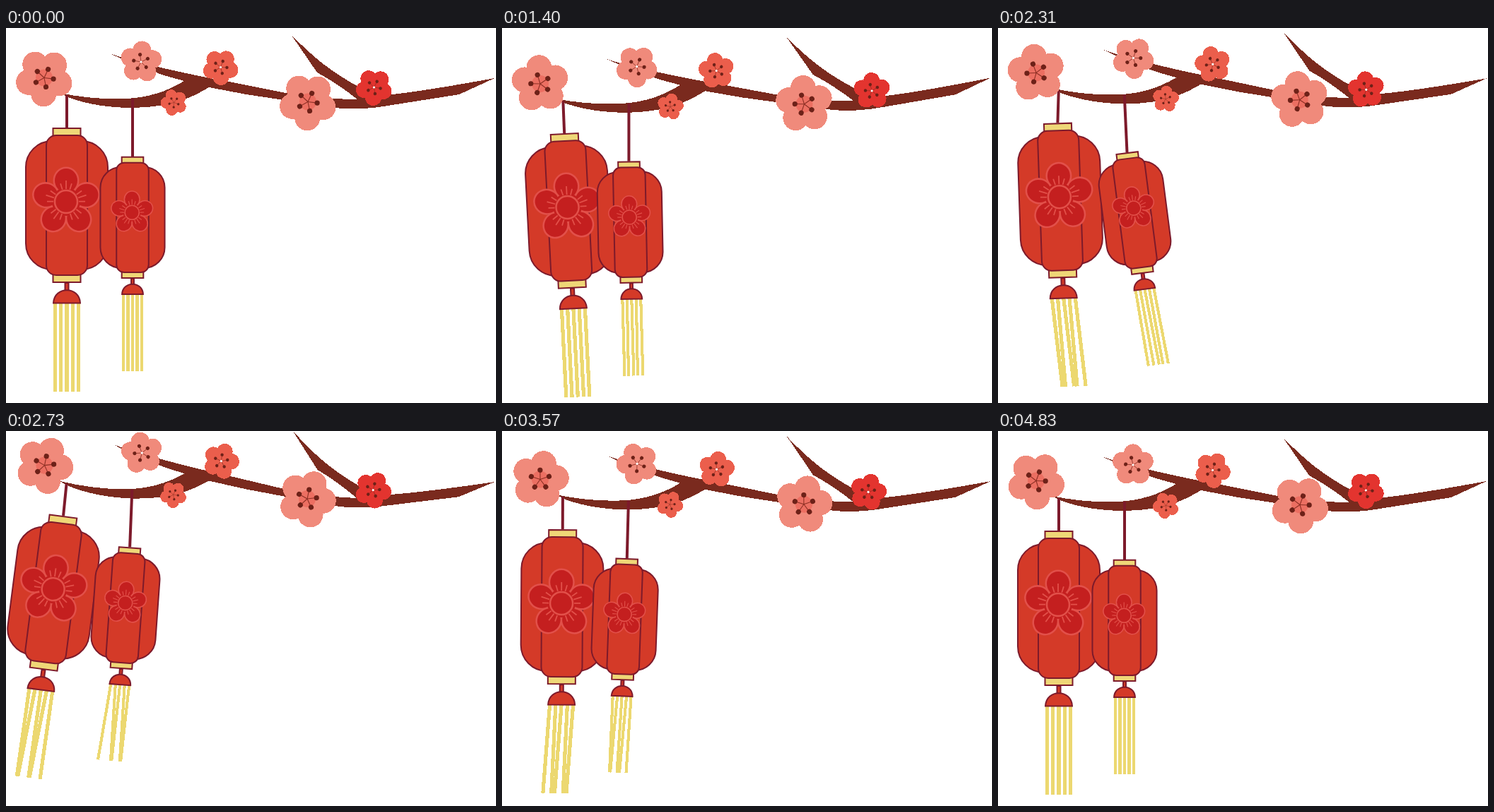
These frames come from a looping animation (693x531 px, 4.9 s). An HTML page:

```html
<!DOCTYPE html>
<html lang="en">
<head>
<meta charset="utf-8">
<title>Lanterns on a blossom branch</title>
<style>
  html, body { margin: 0; width: 100%; height: 100%; overflow: hidden; background: #fff; }
  svg { display: block; width: 100vw; height: 100vh; }
  .edge { stroke: #7d1a2b; stroke-width: 2; vector-effect: non-scaling-stroke; }
  .red { fill: #d43a28; }
  .gold { fill: #efd777; }
  .strand { fill: #ecd870; }
  .emblem { fill: #c41f1f; stroke: #e2504a; }
  .crisp { shape-rendering: crispEdges; }
</style>
</head>
<body>
<svg id="stage" viewBox="0 0 693 531">
  <g id="branch">
    <path class="crisp" fill="#7a2a1e" d="M149 37 C180 48 260 66 300 73 L395 92 Q450 101 497 101
      Q468 78 440 63 L403 9 C434 41 460 63 504 86 L520 96 Q560 95 691 71 L641 94 L540 110
      Q500 117 465 113 L340 94 L287 84 C255 104 225 112 180 113
      Q130 113 90 99 L76 92 Q125 102 170 100 Q215 98 252 75 Q200 62 149 37Z"/>
  </g>
  <g id="lanterns"></g>
  <g id="blossoms"></g>
</svg>
<script>
const LOOP = 4900, STEP = 70;
const PIVOT = { x: 662, y: 74 };
const $ = id => document.getElementById(id);
const spin = (angle, x = 0, y = 0) => `rotate(${angle.toFixed(3)} ${x} ${y})`;
const five = draw => [0, 1, 2, 3, 4].map(draw).join('');

function group(parent, markup) {
  const g = document.createElementNS('http://www.w3.org/2000/svg', 'g');
  g.innerHTML = markup;
  parent.append(g);
  return g;
}

// Rest, first swing, counter swing, rest, each leg eased in and out.
function swing(t, [start, t1, a1, t2, a2, end]) {
  const keys = [[start, 0], [t1, a1], [t2, a2], [end, 0]];
  for (let i = 0; i < 3; i++) {
    const [from, a] = keys[i], [to, b] = keys[i + 1];
    if (t >= from && t < to) {
      const u = (t - from) / (to - from);
      return a + (b - a) * u * u * (3 - 2 * u);
    }
  }
  return 0;
}

const branchSwing = [1110, 1800, -2.1, 2640, 2.1, 3780];

const leftOdd = [1400, 2250, -5, 3250, 7.2, 3950];
const leftEven = [1400, 2050, -5.3, 2950, 5.5, 4100];
const rightFirst = [1250, 2050, -5.2, 2850, 6.3, 3700];
const rightOdd = [1250, 2050, -5.2, 3100, 5.3, 3850];
const rightEven = [1350, 2300, -3, 3350, 4, 4150];

const lanterns = [
  {
    x: 86, y: 95, cord: 46, scale: 1, strand: 125, emblemY: 105, emblemScale: 1,
    cordSwing: [1110, 1800, -6, 2640, 5.8, 3700],
    bodySwing: [1250, 2000, -6.2, 2850, 2.1, 3700],
    strandSwings: [leftOdd, leftEven, leftOdd, leftEven, leftOdd]
  },
  {
    x: 179, y: 100, cord: 82, scale: .785, strand: 138, emblemY: 101, emblemScale: .8,
    cordSwing: [1390, 2050, -4, 3100, 4.8, 3850],
    bodySwing: [1200, 2000, -7.3, 2950, 3.2, 3800],
    strandSwings: [rightFirst, rightEven, rightOdd, rightEven, rightOdd]
  }
];

function emblem(y, scale) {
  const petals = five(i =>
    `<ellipse cy="-30" rx="16" ry="17" transform="${spin(72 * i)}"/>`);
  const rays = five(i => [-17, 0, 17].map(a =>
    `<path d="M0 -18V${a ? -27 : -30}" transform="${spin(72 * i + a)}"/>`).join(''));
  return `<g class="emblem" transform="translate(-1 ${y}) scale(${scale})">
    <g stroke-width="5">${petals}</g><g stroke="none">${petals}<circle r="20"/></g>
    <g stroke-width="1.8">${rays}</g><circle r="16" stroke-width="2.5"/></g>`;
}

for (const l of lanterns) {
  l.node = group($('lanterns'), `
    <path class="edge" style="stroke-width:4" d="M0 0V${l.cord}"/>
    <g class="body">
      <rect class="edge red" x="-58" y="19" width="116" height="182" rx="37"/>
      <rect class="edge gold" x="-19.5" y="1" width="39" height="12"/>
      <rect class="edge gold" x="-19.5" y="207" width="39" height="12"/>
      <rect class="edge red" x="-29" y="11" width="58" height="198" rx="14"/>
      ${emblem(l.emblemY, l.emblemScale)}
      ${five(i => `<rect class="strand crisp" x="${8.25 * (i - 2) - 2.6}" y="248" width="5.2" height="${l.strand + 1}"/>`)}
      <rect class="edge red" x="-2.5" y="220" width="5" height="11"/>
      <path class="edge red" d="M-19 248.5C-18 224 18 224 19 248.5Z"/>
    </g>`);
  l.body = l.node.querySelector('.body');
  l.strands = l.node.querySelectorAll('.strand');
}

// x, y, radius, colour, first petal angle, style of the heart, distance above the turning point
const blossoms = [
  [54, 70.5, 40, '#f08a7b', -52, 'core', 0],
  [191, 48, 29, '#f08a7b', -85, 'hole', 0],
  [303.5, 55.5, 25, '#eb5e4c', -56, 'hole', 0],
  [427, 104.5, 40, '#f08a7b', -52, 'core', 0],
  [520.5, 86.5, 25.5, '#e3342f', -50, 'hole', 2.5],
  [237.5, 105.5, 18.5, '#eb5e4c', -38, 'plain', 0]
].map(([x, y, r, color, angle, heart, lift]) => {
  const reach = r * (heart === 'core' ? .33 : .36), dot = r * (heart === 'core' ? .09 : .088);
  const node = group($('blossoms'), `<g transform="translate(0 ${-lift})">
    <g class="crisp" fill="${color}"><circle r="${r * .5}"/>
      ${five(i => `<circle cx="${r * .57}" r="${r * .45}" transform="${spin(angle + 72 * i)}"/>`)}</g>
    ${heart === 'core' ? `<circle r="${r * .3}" fill="#ec6f62"/>` : ''}
    ${five(i => `<g transform="${spin(angle - 13 + 72 * i)}" fill="#6d2118">
      <path d="M0 0H${reach}" stroke="#8c2f24" stroke-width="${r * .027}"/>
      <circle cx="${reach}" r="${dot}"/></g>`)}
    ${heart === 'hole' ? '<circle r="1.6" fill="#fff"/>' : ''}</g>`);
  return { x, y, node };
});

function draw(t) {
  const tilt = swing(t, branchSwing), rad = tilt * Math.PI / 180;
  const branchTurn = spin(tilt, PIVOT.x, PIVOT.y);
  $('branch').setAttribute('transform', branchTurn);
  $('blossoms').setAttribute('transform', branchTurn);

  for (const b of blossoms)
    b.node.setAttribute('transform', `translate(${b.x} ${b.y}) ${spin(360 * t / LOOP)}`);

  for (const l of lanterns) {
    const dx = l.x - PIVOT.x, dy = l.y - PIVOT.y;
    const x = PIVOT.x + dx * Math.cos(rad) - dy * Math.sin(rad);
    const y = PIVOT.y + dx * Math.sin(rad) + dy * Math.cos(rad);
    l.node.setAttribute('transform', `translate(${x} ${y}) ${spin(swing(t, l.cordSwing))}`);
    l.body.setAttribute('transform',
      `translate(0 ${l.cord}) ${spin(swing(t, l.bodySwing))} scale(${l.scale})`);
    l.strands.forEach((s, i) =>
      s.setAttribute('transform', spin(swing(t, l.strandSwings[i]), 8.25 * (i - 2), 248)));
  }
}

const began = performance.now();
function tick() {
  const t = (performance.now() - began) % LOOP;
  draw(Math.floor(t / STEP) * STEP);
  requestAnimationFrame(tick);
}
tick();
</script>
</body>
</html>
```
